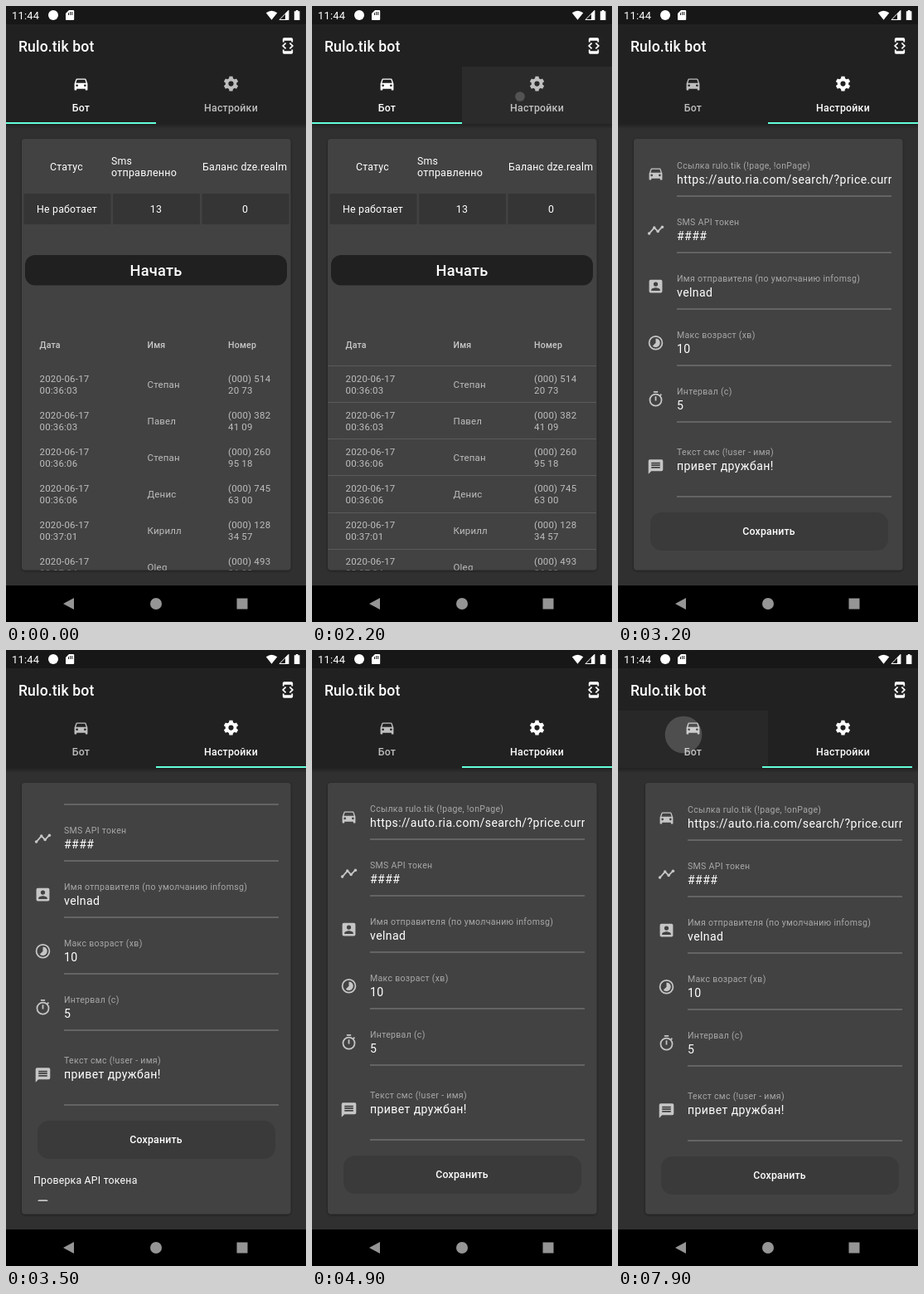
Recreate the animation shown at these times as an HTML page. Size 362 px wide and 742 px high, loop 8000 ms.

```html
<!DOCTYPE html>
<html lang="ru">
<head>
<meta charset="utf-8">
<title>Bot</title>
<style>
html, body { margin: 0; width: 100%; height: 100%; overflow: hidden; background: #000; }
svg { display: block; width: 362px; height: 742px; font-family: Roboto, "Noto Sans", sans-serif; }
</style>
</head>
<body>
<svg id="stage" viewBox="0 0 362 742" xmlns="http://www.w3.org/2000/svg"></svg>
<script>
const LOOP = 8000, STEP = 100, W = 362, MAX_SCROLL = 142;

const rect = (x, y, w, h, fill, r = 0, extra = '') =>
  `<rect x="${x}" y="${y}" width="${w}" height="${h}" rx="${r}" fill="${fill}" ${extra}/>`;

const text = (x, y, str, size, { fill = '#fff', weight = 400, anchor = 'start', gap = .22 } = {}) =>
  `<text x="${x}" y="${y}" font-size="${size}" fill="${fill}" font-weight="${weight}" ` +
  `text-anchor="${anchor}" letter-spacing="${gap}">${str}</text>`;

// Icons live in a 24 x 24 box and take their colour from the parent.
const line = (d, w = 2) => `<path d="${d}" fill="none" stroke="currentColor" stroke-width="${w}"/>`;
const dot = (x, y, r) => `<circle cx="${x}" cy="${y}" r="${r}"/>`;
const solid = d => `<path fill-rule="evenodd" d="${d}"/>`;
const teeth = [0, 60, 120, 180, 240, 300]
  .map(a => `<path d="M9 6L9.7 2H14.3L15 6z" transform="rotate(${a} 12 12)"/>`).join('');
const nodes = [[3, 17], [10, 9], [15, 14], [21, 8]];

const icons = {
  car: solid('M18.92 6C18.7 5.4 18.2 5 17.5 5h-11c-.66 0-1.2.4-1.42 1L3 12v8a1 1 0 0 0 1 1h1a1 1 0 0 0 1-1v-1h12v1a1 1 0 0 0 1 1h1a1 1 0 0 0 1-1v-8zM5 14.5a1.5 1.5 0 1 0 3 0a1.5 1.5 0 1 0-3 0zM16 14.5a1.5 1.5 0 1 0 3 0a1.5 1.5 0 1 0-3 0zM5 11l1.5-4.5h11L19 11z'),
  gear: `<circle cx="12" cy="12" r="5.6" fill="none" stroke="currentColor" stroke-width="4.2"/>` + teeth,
  graph: line('M' + nodes.join('L')) + nodes.map(([x, y]) => dot(x, y, 2)).join(''),
  person: solid('M3 5v14a2 2 0 0 0 2 2h14a2 2 0 0 0 2-2V5a2 2 0 0 0-2-2H5a2 2 0 0 0-2 2zM15 9a3 3 0 1 1-6 0a3 3 0 1 1 6 0zM6 17c0-2 4-3.1 6-3.1s6 1.1 6 3.1v1H6z'),
  lapse: `<circle cx="12" cy="12" r="9" fill="none" stroke="currentColor" stroke-width="2"/>` +
    solid('M12 6v6l-4.24 4.24A6 6 0 1 0 12 6z'),
  timer: `<circle cx="12" cy="13" r="8" fill="none" stroke="currentColor" stroke-width="2"/>` +
    line('M9 2h6M12 8v6M18 7l1.8-1.8'),
  chat: solid('M20 2H4a2 2 0 0 0-2 2v18l4-4h14a2 2 0 0 0 2-2V4a2 2 0 0 0-2-2zM18 14H6v-2h12zM18 11H6V9h12zM18 8H6V6h12z'),
  phone: solid('M17 1H7a2 2 0 0 0-2 2v18a2 2 0 0 0 2 2h10a2 2 0 0 0 2-2V3a2 2 0 0 0-2-2zM17 19H7V5h10z'),
  dev: line('M6 7V3a1 1 0 0 1 1-1h10a1 1 0 0 1 1 1v4M6 17v4a1 1 0 0 0 1 1h10a1 1 0 0 0 1-1v-4M6 4h12M6 20h12') +
    line('M9.3 8.1L5.4 12l3.9 3.9M14.7 8.1l3.9 3.9l-3.9 3.9')
};
const icon = (name, cx, cy, color = '#fff') =>
  `<g transform="translate(${cx - 10.56} ${cy - 10.56}) scale(.88)" fill="${color}" color="${color}">${icons[name]}</g>`;

const card = `<g filter="url(#lift)">${rect(19, 160, 324.5, 519.5, '#424242', 4)}</g>`;

function botPage() {
  const mid = { anchor: 'middle' };
  const head = { fill: '#c8c8c8', weight: 500 };
  const cell = { fill: '#bebebe' };
  const rows = [
    ['00:36:03', 'Степан', '(000) 514', '20 73'],
    ['00:36:03', 'Павел', '(000) 382', '41 09'],
    ['00:36:06', 'Степан', '(000) 260', '95 18'],
    ['00:36:06', 'Денис', '(000) 745', '63 00'],
    ['00:37:01', 'Кирилл', '(000) 128', '34 57'],
    ['00:37:04', 'Oleg', '(000) 493', '86 20']
  ];
  let s = card + text(73, 197.5, 'Статус', 12.32, mid) +
    text(127, 190.5, 'Sms', 12.32) + text(127, 205, 'отправленно', 12.5) +
    text(237, 197.5, 'Баланс dze.realm', 12.32);
  ['Не работает', '13', '0'].forEach((v, i) => {
    s += rect(21.5 + i * 107.5, 226, 105, 37, '#353535', 1) + text(73.5 + i * 107.5, 249, v, 12.32, mid);
  });
  s += rect(23, 300, 316, 36.5, '#202020', 12) +
    text(181, 325, 'Начать', 18.2, { anchor: 'middle', weight: 500 });
  s += text(40.5, 411.5, 'Дата', 10.56, head) + text(170.5, 411.5, 'Имя', 10.56, head) +
    text(268, 411.5, 'Номер', 10.56, head);
  let lines = '', body = '';
  rows.forEach(([time, name, a, b], i) => {
    const y = 433.3 + i * 44.05;
    lines += rect(19, Math.round(y), 324, 1, '#5a5a5a');
    body += text(40.5, y + 19.8, '2020-06-17', 11.44, cell) + text(40.5, y + 33.6, time, 11.44, cell) +
      text(170.5, y + 26.6, name, 11.44, cell) +
      text(268, y + 19.8, a, 11.44, cell) + text(268, y + 33.6, b, 11.44, cell);
  });
  return s + `<g clip-path="url(#cardClip)"><g id="lines">${lines}</g>${body}</g>`;
}

function settingsPage() {
  const fields = [
    ['car', 'Ссылка rulo.tik (!page, !onPage)', 'https://auto.ria.com/search/?price.currency=1'],
    ['graph', 'SMS API токен', '####'],
    ['person', 'Имя отправителя (по умолчанию infomsg)', 'velnad'],
    ['lapse', 'Макс возраст (хв)', '10'],
    ['timer', 'Интервал (с)', '5'],
    ['chat', 'Текст смс (!user - имя)', 'привет дружбан!']
  ];
  const grey = '#c6c6c6';
  const rule = y => rect(70, y, 259, 1, '#868686');
  const button = (y, label) => rect(38, y, 287, 46, '#3a3a3a', 14) +
    text(181, y + 27, label, 12.32, { anchor: 'middle', weight: 500 });
  let s = '';
  fields.forEach(([name, label, value], i) => {
    const last = i === 5, y = 192 + i * 68 + (last ? 5 : 0);
    s += icon(name, 44.5, y + (last ? 18 : 9.7), grey) +
      text(70, y + 4, label, 10.56, { fill: '#a8a8a8', gap: .3 }) +
      text(70, y + 22, value, 14.08, { gap: .4 }) + rule(y + (last ? 53.5 : 36.5));
  });
  s += button(610, 'Сохранить') + text(33, 685.5, 'Проверка API токена', 12.32) +
    icon('phone', 44.5, 715, grey) +
    text(70, 720, 'Номер телефона (380...)', 14.08, { fill: '#a0a0a0', gap: .4 }) +
    rule(742) + button(752.5, 'Отправить смс');
  return card + `<g id="nudge"><g clip-path="url(#viewClip)"><g id="scroll">${s}</g>
    <path id="glow" fill="#64ffda"/></g></g>`;
}

function statusBar() {
  return rect(0, 0, W, 22, '#171717') + text(7, 16, '11:44', 12.9) +
    `<g fill="#fff">${dot(57, 11, 6)}
    <path fill-rule="evenodd" d="M76 5h5.2q1 0 1 1v10q0 1-1 1h-8.2q-1 0-1-1V9zM75 8.3v2.6h1V8.3zM77.2 7v3.9h1V7zM79.3 7v3.9h1V7z"/>
    <path d="M313.8 8.3Q320.5 3.2 327.3 8.3L320.5 16.8z"/>
    <path d="M340.8 5.5V16.5H330z" fill="none" stroke="#fff"/><path d="M337 9.3l4.2-4.3V17H337z"/>
    <path d="M349.8 5h2.6v1.2h2V17h-6.6V6.2h2z"/></g>`;
}

function tabs() {
  const tab = (id, cx, name, label) => `<g id="${id}">${icon(name, cx, 93.6)}` +
    text(cx, 127, label, 12.32, { anchor: 'middle', weight: 500 }) + '</g>';
  return rect(0, 22, W, 120, '#212121') + rect(0, 142, W, 6, 'url(#shade)') +
    text(15, 54.5, 'Rulo.tik bot', 17.6, { weight: 500, gap: .13 }) + icon('dev', 340, 48) +
    `<g clip-path="url(#tabClip)"><rect id="hover" y="73" width="181" height="69" fill="#ccc"/>
    <circle id="splash" fill="#ccc"/></g>` +
    tab('tabBot', 90.5, 'car', 'Бот') + tab('tabSet', 271.5, 'gear', 'Настройки') +
    rect(0, 140, 181, 2, '#64ffda', 0, 'id="bar"');
}

const navBar = rect(0, 698, W, 44, '#000') +
  `<g fill="#959595"><path d="M69 720L82 713V727z"/>${dot(181, 720, 7)}<path d="M278.5 713.5h13v13h-13z"/></g>`;

const stage = document.getElementById('stage');
stage.innerHTML = `<defs>
  <filter id="lift" x="-5%" y="-5%" width="110%" height="110%">
    <feDropShadow dx="0" dy="1" stdDeviation="1.5" flood-color="#000" flood-opacity=".45"/></filter>
  <linearGradient id="shade" x2="0" y2="1"><stop stop-color="#000" stop-opacity=".3"/>
    <stop offset="1" stop-color="#000" stop-opacity="0"/></linearGradient>
  <clipPath id="cardClip">${rect(19, 160, 324.5, 519.5, '#000', 4)}</clipPath>
  <clipPath id="viewClip">${rect(33, 176, 296, 488, '#000')}</clipPath>
  <clipPath id="tabClip"><rect id="tabArea" y="73" width="181" height="69"/></clipPath></defs>` +
  rect(0, 0, W, 742, '#303030') +
  `<g id="bot">${botPage()}</g><g id="settings">${settingsPage()}</g>` +
  tabs() + statusBar() + navBar;

const el = {};
stage.querySelectorAll('[id]').forEach(n => el[n.id] = n);
const set = (id, attrs) => { for (const k in attrs) el[id].setAttribute(k, attrs[k]); };
const move = (id, x, y) => set(id, { transform: `translate(${x} ${y})` });

const clamp = v => Math.min(1, Math.max(0, v));
const span = (t, from, len) => clamp((t - from) / len);
const smooth = v => v * v * (3 - 2 * v);

// cubic-bezier(.25, .1, .25, 1)
function ease(x) {
  let lo = 0, hi = 1, u = .5;
  for (let i = 0; i < 24; i++) {
    u = (lo + hi) / 2;
    if (.75 * u * (1 - u) + u ** 3 < x) lo = u; else hi = u;
  }
  return x <= 0 ? 0 : x >= 1 ? 1 : .3 * u * (1 - u) ** 2 + 3 * u * u * (1 - u) + u ** 3;
}

const taps = [
  { x: 251, y: 109, left: 181, down: 2150, up: 2330, reach: 117 },
  { x: 79, y: 102, left: 0, down: 7745, up: 7883, reach: 110 }
];

// Overscroll glow: [time, height, opacity]
const glows = [
  { bottom: true, keys: [[3900, 0, 0], [4000, 30, .1], [4100, 43, .13], [4200, 46, .09], [4300, 30, .04], [4400, 0, 0]] },
  { bottom: false, keys: [[5700, 0, 0], [5900, 18, .12], [6000, 24, .13], [6200, 16, .11], [6400, 0, 0]] }
];

function between(keys, t) {
  const i = keys.findIndex(k => k[0] > t);
  if (i < 1) return [0, 0];
  const a = keys[i - 1], b = keys[i], f = (t - a[0]) / (b[0] - a[0]);
  return [1, 2].map(n => a[n] + (b[n] - a[n]) * f);
}

function drawTap(t) {
  const tap = taps[t < 5000 ? 0 : 1];
  const held = Math.max(0, Math.min(t, tap.up) - tap.down);
  const after = Math.max(0, t - tap.up);
  const start = tap.reach * held / 1000;
  const r = start + (tap.reach - start) * clamp(after / 225);
  set('tabArea', { x: tap.left });
  set('hover', { x: tap.left, opacity: .08 * clamp(held / 70) * (1 - clamp(after / 35)) });
  set('splash', { cx: tap.x, cy: tap.y, r, opacity: held ? .25 * (1 - clamp(after / 200)) : 0 });
}

function drawGlow(t) {
  const { bottom, keys } = glows[t < 5000 ? 0 : 1];
  const [h, opacity] = between(keys, t);
  const base = bottom ? 664 : 176, dir = bottom ? -1 : 1;
  const side = base + dir * h * .7, peak = base + dir * h * 1.3;
  set('glow', { d: `M33 ${base}V${side}Q186 ${peak} 329 ${side}V${base}z`, opacity });
}

function draw(t) {
  const page = ease(span(t, 2330, 300)) - ease(span(t, 7883, 300));
  move('bot', Math.round(-W * page), 0);
  move('settings', Math.round(W * (1 - page)), 0);
  move('nudge', t >= 2700 && t < 3300 ? 1 : 0, 0);
  set('bar', { x: Math.round(181 * page) });
  set('tabBot', { opacity: 1 - .3 * page });
  set('tabSet', { opacity: .7 + .3 * page });
  set('lines', { opacity: span(t, 0, 900) });
  const scroll = t < 4600 ? smooth(span(t, 3300, 550)) : (1 - span(t, 4620, 310)) ** 2;
  move('scroll', 0, -Math.round(MAX_SCROLL * scroll));
  drawTap(t);
  drawGlow(t);
}

const begin = performance.now();
function tick() {
  const t = (performance.now() - begin) % LOOP;
  draw(Math.floor(t / STEP) * STEP);
  requestAnimationFrame(tick);
}
tick();
</script>
</body>
</html>
```
